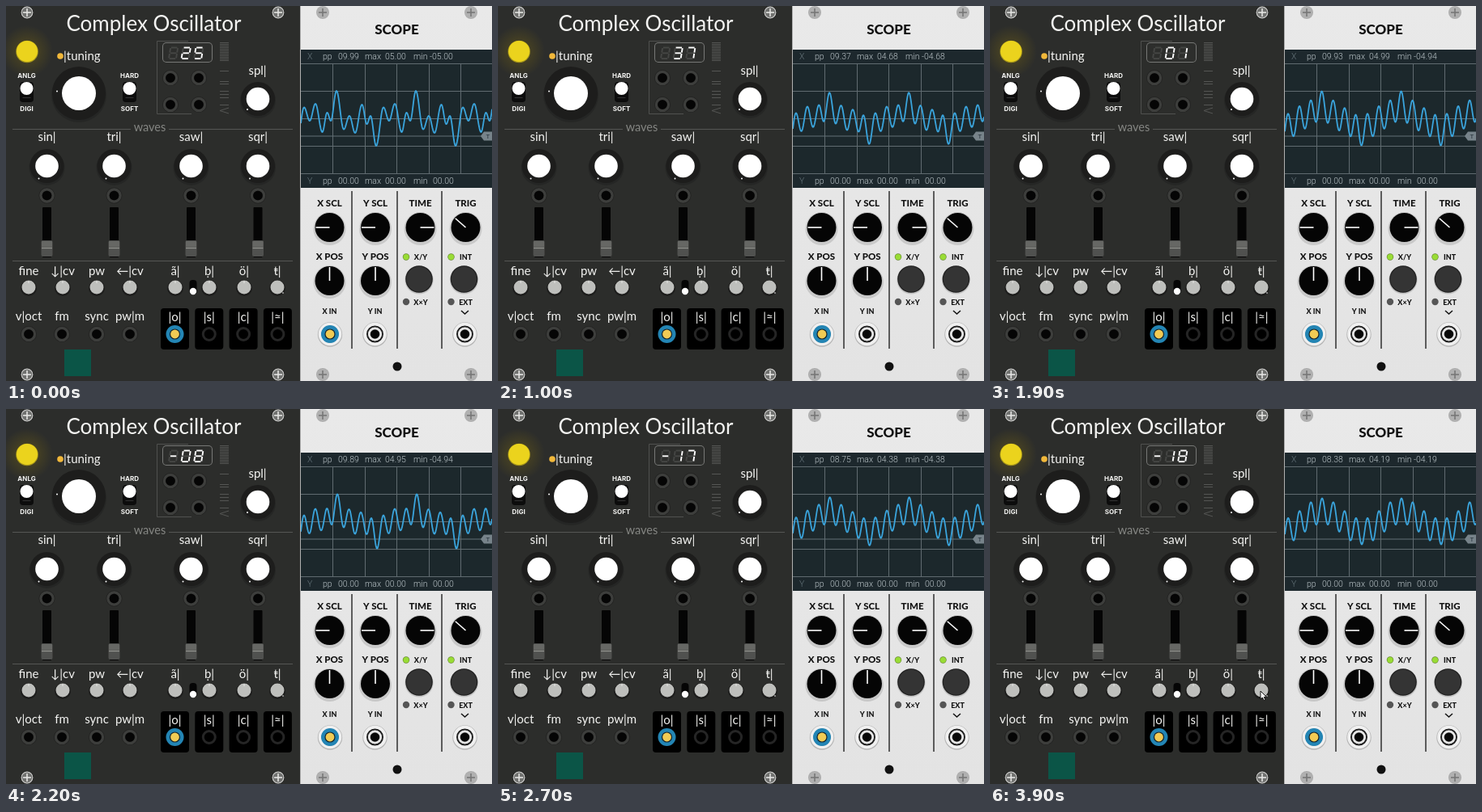
These frames come from a looping animation (600 by 464 pixels, 4000 ms). An HTML page with a canvas:

```html
<!DOCTYPE html>
<html lang="en">
<head>
<meta charset="utf-8">
<title>Oscillator and scope</title>
<style>
  html, body { margin: 0; width: 100%; height: 100%; overflow: hidden; background: #2c2d2b; }
  canvas { display: block; width: 600px; height: 464px; }
</style>
</head>
<body>
<canvas id="stage" width="600" height="464"></canvas>
<script>
const LOOP = 4000, STEP = 100, TAU = Math.PI * 2;
const stage = document.getElementById('stage');
const screen = stage.getContext('2d');
const panel = document.createElement('canvas');
panel.width = 600;
panel.height = 464;
let c = panel.getContext('2d');

// time, tuning value, scope maximum, scope minimum, trace amplitude, blend of the two wave shapes
const KEYS = [
  [0, 25, 4.996, -4.996, 5, 0],
  [300, 39.5, 4.95, -4.95, 4.95, .2],
  [600, 45, 4.8, -4.8, 4.8, .4],
  [1000, 37, 4.684, -4.684, 4.68, .6],
  [1500, 17, 3.83, -4.04, 4.3, 1],
  [1900, 1, 4.99, -4.94, 4.93, .8],
  [2400, -14, 4.93, -4.94, 4.96, .35],
  [2800, -18, 4.19, -4.19, 4.19, 1],
  [4000, -18, 4.19, -4.19, 4.19, 1]
];

function stateAt(t) {
  const i = KEYS.findIndex(k => k[0] > t);
  const a = KEYS[i - 1], b = KEYS[i];
  const p = (t - a[0]) / (b[0] - a[0]);
  return a.slice(1).map((v, n) => v + (b[n + 1] - v) * p);
}

function circle(x, y, r, fill) {
  c.beginPath();
  c.arc(x, y, r, 0, TAU);
  c.fillStyle = fill;
  c.fill();
}

function ring(x, y, r, color, width) {
  c.beginPath();
  c.arc(x, y, r, 0, TAU);
  c.strokeStyle = color;
  c.lineWidth = width;
  c.stroke();
}

function box(x, y, w, h, r, fill) {
  c.beginPath();
  c.roundRect(x, y, w, h, r);
  c.fillStyle = fill;
  c.fill();
}

function path(points, color, width) {
  c.beginPath();
  points.forEach(([x, y]) => c.lineTo(x, y));
  c.strokeStyle = color;
  c.lineWidth = width;
  c.stroke();
}

const line = (x1, y1, x2, y2, color, width = 1) => path([[x1, y1], [x2, y2]], color, width);

function label(text, x, y, size, color = '#f4f4f2', weight = 400, align = 'center', family = 'Lato') {
  c.font = `${weight} ${size}px ${family}, sans-serif`;
  c.textAlign = align;
  c.fillStyle = color;
  c.fillText(text, x, y);
}

function screw(x, y, fill, mark) {
  circle(x, y, 8, 'rgba(0,0,0,.25)');
  circle(x, y, 7.3, fill);
  line(x - 5, y, x + 5, y, mark, 1.6);
  line(x, y - 5, x, y + 5, mark, 1.6);
}

function bigKnob(x, y, r, cap, dotX, dotY) {
  circle(x, y + 2, r + 1, 'rgba(0,0,0,.15)');
  circle(x, y, r, '#1d1d1c');
  circle(x, y, cap, '#fff');
  circle(x + dotX, y + dotY, 1, '#fff');
}

function darkJack(x, y) {
  circle(x, y, 10, '#222221');
  ring(x, y, 7.6, '#3d3e3c', 3.2);
  circle(x, y, 5.8, '#050505');
}

function plug(x, y) {
  circle(x, y, 11, '#2385b4');
  circle(x, y, 6.6, '#17242b');
  circle(x, y, 5.4, '#f1cb54');
}

function toggle(x, top, bottom) {
  label(top, x, 89, 8, '#f4f4f2', 700, 'center', 'Inter');
  label(bottom, x, 130, 8, '#f4f4f2', 700, 'center', 'Inter');
  box(x - 8.5, 94, 17, 25, 4, '#0c0c0c');
  line(x - 5, 113.5, x + 5, 113.5, '#333', 1);
  circle(x, 102, 8, '#fff');
}

function drawOscillator() {
  c.fillStyle = '#2c2d2b';
  c.fillRect(0, 0, 364, 464);
  [26, 336].forEach(x => [8, 456].forEach(y => {
    screw(x, y, '#70716f', '#e4e4e2');
    ring(x, y, 6.8, '#c6c6c4', 1.2);
  }));
  label('Complex Oscillator', 182.5, 30.5, 26);

  const glow = c.createRadialGradient(26, 56, 12, 26, 56, 32);
  glow.addColorStop(0, 'rgba(150,125,10,.24)');
  glow.addColorStop(1, 'rgba(150,125,10,0)');
  circle(26, 56, 32, glow);
  circle(26, 56.5, 13.8, '#a4941c');
  circle(26, 56, 13, '#ebd31d');
  circle(67, 62, 3.8, '#f2b83a');
  label('|tuning', 71, 67, 15, undefined, 400, 'left');
  toggle(25.5, 'ANLG', 'DIGI');
  toggle(152.5, 'HARD', 'SOFT');
  bigKnob(90, 108, 33, 21, -27, -2.5);
  label('spl|', 310.5, 85, 15);
  bigKnob(311, 115, 21, 14.3, -13, 13);

  path([[225, 43.5], [186.5, 43.5], [186.5, 133.5], [229, 133.5]], '#50514f', 1);
  [203, 238].forEach(x => [89, 122].forEach(y => darkJack(x, y)));
  for (let y = 45.5; y < 68; y += 2) line(264, y, 275, y, '#555654');
  [80, 93, 96, 105, 109, 113, 122].forEach(y => line(264, y + .5, 275, y + .5, '#555654'));
  path([[275, 126], [264, 129.5], [275, 133]], '#555654', 1);

  line(8, 152.5, 154, 152.5, '#555654');
  line(201, 152.5, 354, 152.5, '#555654');
  label('waves', 177.5, 155, 14.5, '#858683');
  [['sin|', 50.5], ['tri|', 133.5], ['saw|', 228.5], ['sqr|', 311]].forEach(([name, x]) => {
    label(name, x, 166.5, 15);
    bigKnob(x, 198, 21, 14.3, -10, 15.5);
    darkJack(x, 234.5);
    box(x - 5.5, 249, 11, 62, 1, '#050505');
    box(x - 7, 290, 14, 20, 2, '#50514f');
    c.fillStyle = '#666764';
    c.fillRect(x - 6.5, 291, 13, 7);
    line(x - 6.5, 299.5, x + 6.5, 299.5, '#92938f', 1.3);
  });

  line(8, 315.5, 354, 315.5, '#555654');
  [['fine', 28], ['↓|cv', 70], ['pw', 112], ['←|cv', 153], ['ã|', 209], ['ḅ|', 251], ['ö|', 294], ['ŧ|', 335]]
    .forEach(([name, x], i) => {
      label(name, x, 332.5, 15);
      circle(x, 349, 10, '#1d1d1c');
      circle(x, 348, 8.5, '#bebfbc');
      if (i === 7) circle(x + 7, 355, .8, '#fff');
      else line(x, 340, x, 343, '#e6e6e4');
    });
  box(226.5, 339, 9, 18, 4, '#050505');
  circle(231, 353, 4.2, '#fff');

  [['v|oct', 28], ['fm', 69], ['sync', 112], ['pw|m', 153]].forEach(([name, x]) => {
    label(name, x, 389, 15);
    darkJack(x, 406);
  });
  ['|o|', '|s|', '|c|', '|≈|'].forEach((name, i) => {
    const x = 208.5 + i * 42.3;
    box(x - 17.5, 374, 35, 51, 4, '#000');
    label(name, x, 390, 15);
    if (i) ring(x, 406, 7.5, '#252525', 3);
  });
  plug(208.5, 406);
  box(72, 425, 33, 33, 0, '#0b5547');
}

function scopeKnob(x, y, angle) {
  circle(x, y + 2, 20, 'rgba(0,0,0,.12)');
  circle(x, y, 19, '#cacaca');
  circle(x, y, 18, '#050505');
  line(x, y, x + 17 * Math.cos(angle), y + 17 * Math.sin(angle), '#fff', 1.6);
}

function scopeJack(x) {
  circle(x, 406.5, 15.2, '#b5b5b5');
  circle(x, 406, 14.3, '#f0f0f0');
  ring(x, 406, 9.5, '#202020', 2);
  ring(x, 406, 7.2, '#e4e4e4', 2);
  circle(x, 406, 5.8, '#080808');
}

function drawScope() {
  const ink = '#111';
  const shade = c.createLinearGradient(0, 0, 0, 464);
  shade.addColorStop(0, '#e9e9e9');
  shade.addColorStop(1, '#e3e3e3');
  c.fillStyle = shade;
  c.fillRect(363, 0, 237, 464);
  line(363.5, 0, 363.5, 464, '#b0b0b0', 1);
  [391, 574].forEach(x => [8, 456].forEach(y => screw(x, y, '#b0b0b0', '#777')));
  label('SCOPE', 482.5, 34.5, 17, ink, 800);

  c.fillStyle = '#1c282c';
  c.fillRect(364, 54, 236, 171);
  c.fillStyle = '#1d282d';
  c.fillRect(364, 54, 236, 17);
  c.fillRect(364, 207, 236, 18);
  for (let i = 0; i < 5; i++) {
    line(364, 71.5 + i * 34, 600, 71.5 + i * 34, '#606b70');
    const x = Math.round(403 + i * 39.5) + .5;
    line(x, 71, x, 207, '#606b70');
  }
  line(364, 161, 588, 161, '#627077');

  [427, 483, 538].forEach(x => line(x, 229, x, 424, '#222', 1.4));
  [['X SCL', 399.5, Math.PI], ['Y SCL', 456, Math.PI], ['TIME', 511.5, 0], ['TRIG', 567.5, -2.42]]
    .forEach(([name, x, angle]) => {
      label(name, x, 248, 11.5, ink, 800);
      scopeKnob(x, 274, angle);
    });
  [['X POS', 399.5], ['Y POS', 456]].forEach(([name, x]) => {
    label(name, x, 314, 11.5, ink, 800);
    scopeKnob(x, 340, -Math.PI / 2);
  });
  [['X/Y', 'X×Y', 511], ['INT', 'EXT', 566.5]].forEach(([upper, lower, x]) => {
    circle(x - 17, 310.5, 4.2, '#668a30');
    circle(x - 17, 310.5, 3.5, '#99dc35');
    circle(x - 17, 366, 4.2, '#555');
    label(upper, x + 1, 313.5, 9, ink, 800);
    label(lower, x + 1, 369.5, 9, ink, 800);
    circle(x - 1, 339, 17.6, '#c4c4c4');
    circle(x - 1, 338, 16.8, '#222');
    circle(x - 1, 338, 15.5, '#343434');
  });
  label('X IN', 399.5, 381, 9, ink, 800);
  label('Y IN', 455.5, 381, 9, ink, 800);
  path([[562, 377], [566.5, 381], [571, 377]], ink, 1.5);
  [400, 455.5, 566.5].forEach(scopeJack);
  plug(400, 406);
  circle(483, 446, 5.5, ink);
}

// segments run clockwise from the top, then the middle bar
const SEGMENTS = [[0, 0, 1, 0], [1, 0, 1, 1], [1, 1, 1, 2], [0, 2, 1, 2], [0, 1, 0, 2], [0, 0, 0, 1], [0, 1, 1, 1]];
const GLYPHS = { 0: '012345', 1: '12', 2: '01346', 3: '01236', 4: '1256', 5: '02356', 6: '023456', 7: '012', 8: '0123456', 9: '012356', '-': '6', ' ': '' };

function digit(char, x) {
  const place = (u, v) => [x + u * 9 + (2 - v) * 1.1, 51.5 + v * 6.8];
  const bars = lit => SEGMENTS.forEach(([a, b, d, e], i) => {
    if (GLYPHS[char].includes(i) !== lit) return;
    const [x1, y1] = place(a, b), [x2, y2] = place(d, e);
    const gap = .09;
    line(x1 + (x2 - x1) * gap, y1 + (y2 - y1) * gap,
      x2 - (x2 - x1) * gap, y2 - (y2 - y1) * gap, lit ? '#fff' : '#454644', 1.9);
  });
  bars(false);
  bars(true);
}

function drawDisplay(value) {
  const n = Math.round(value);
  const text = (n < 0 ? '-' : ' ') + String(Math.abs(n)).padStart(2, '0');
  box(193, 45, 62, 25, 5, '#777876');
  box(194, 46, 60, 23, 4, '#2d2e2c');
  [...text].forEach((char, i) => digit(char, 201 + i * 15.6));
}

function volts(v) {
  const cents = Math.abs(v).toFixed(2).padStart(5, '0');
  return v < 0 ? '-' + cents : cents;
}

function readout(axis, y, max, min) {
  const put = (text, x, color = '#bcc6ca') => label(text, x, y, 10.5, color, 300, 'left', 'Roboto');
  put(axis, 372, '#66747b');
  [['pp', 391], [volts(max - min), 410], ['max', 443], [volts(max), 468], ['min', 503], [volts(min), min < 0 ? 523 : 527]]
    .forEach(([text, x]) => put(text, x));
}

// Turning points of half a cycle; the other half mirrors them about the zero line.
const HALF = 49;
const FOLDS = [[0, 1], [9, -.4], [16, .09], [23, -.53], [31.5, .5], [37.5, -.21], [42, .09], [HALF, -1]];

function folded(x) {
  const i = FOLDS.findIndex(f => f[0] > x);
  const [x1, y1] = FOLDS[i - 1], [x2, y2] = FOLDS[i];
  return y1 + (y2 - y1) * (1 - Math.cos(Math.PI * (x - x1) / (x2 - x1))) / 2;
}

function wave(x, blend) {
  const cell = Math.floor(x / HALF);
  const fold = folded(x - cell * HALF) * (cell % 2 ? -1 : 1);
  const phase = x / HALF * Math.PI;
  const ripple = .45 * Math.cos(phase) + .55 * Math.cos(7 * phase);
  return fold + (ripple - fold) * blend;
}

function drawTrace(amplitude, blend) {
  const peakX = 408 + 2 * blend;
  const points = [];
  for (let x = 364; x <= 600; x += .5) points.push([x, 139 - amplitude * 6.8 * wave(x - peakX, blend)]);
  c.save();
  c.beginPath();
  c.rect(364, 71, 236, 136);
  c.clip();
  c.lineJoin = 'round';
  path(points, '#3aa4dc', 1.8);
  c.restore();
}

function drawTrigger() {
  c.beginPath();
  [[586, 161], [590, 155.5], [600, 155.5], [600, 166.5], [590, 166.5]].forEach(([x, y]) => c.lineTo(x, y));
  c.fillStyle = '#77838a';
  c.fill();
  label('T', 595, 164, 8, '#233038', 400, 'center', 'Roboto');
}

function drawCursor(x, y) {
  c.beginPath();
  [[0, 0], [0, 10], [2.4, 8], [4, 11.5], [5.8, 10.7], [4.3, 7.3], [7.3, 7.2]]
    .forEach(([dx, dy]) => c.lineTo(x + dx, y + dy));
  c.closePath();
  c.fillStyle = '#fff';
  c.fill();
  c.strokeStyle = '#111';
  c.lineWidth = 1;
  c.stroke();
}

drawOscillator();
drawScope();
c = screen;
const start = performance.now();

function frame() {
  const t = Math.floor((performance.now() - start) % LOOP / STEP) * STEP;
  const [value, max, min, amplitude, blend] = stateAt(t);
  c.drawImage(panel, 0, 0);
  drawDisplay(value);
  readout('X', 66, max, min);
  readout('Y', 219.5, 0, 0);
  drawTrace(amplitude, blend);
  drawTrigger();
  if (t >= 3000) drawCursor(334, 349);
  requestAnimationFrame(frame);
}

frame();
</script>
</body>
</html>
```
